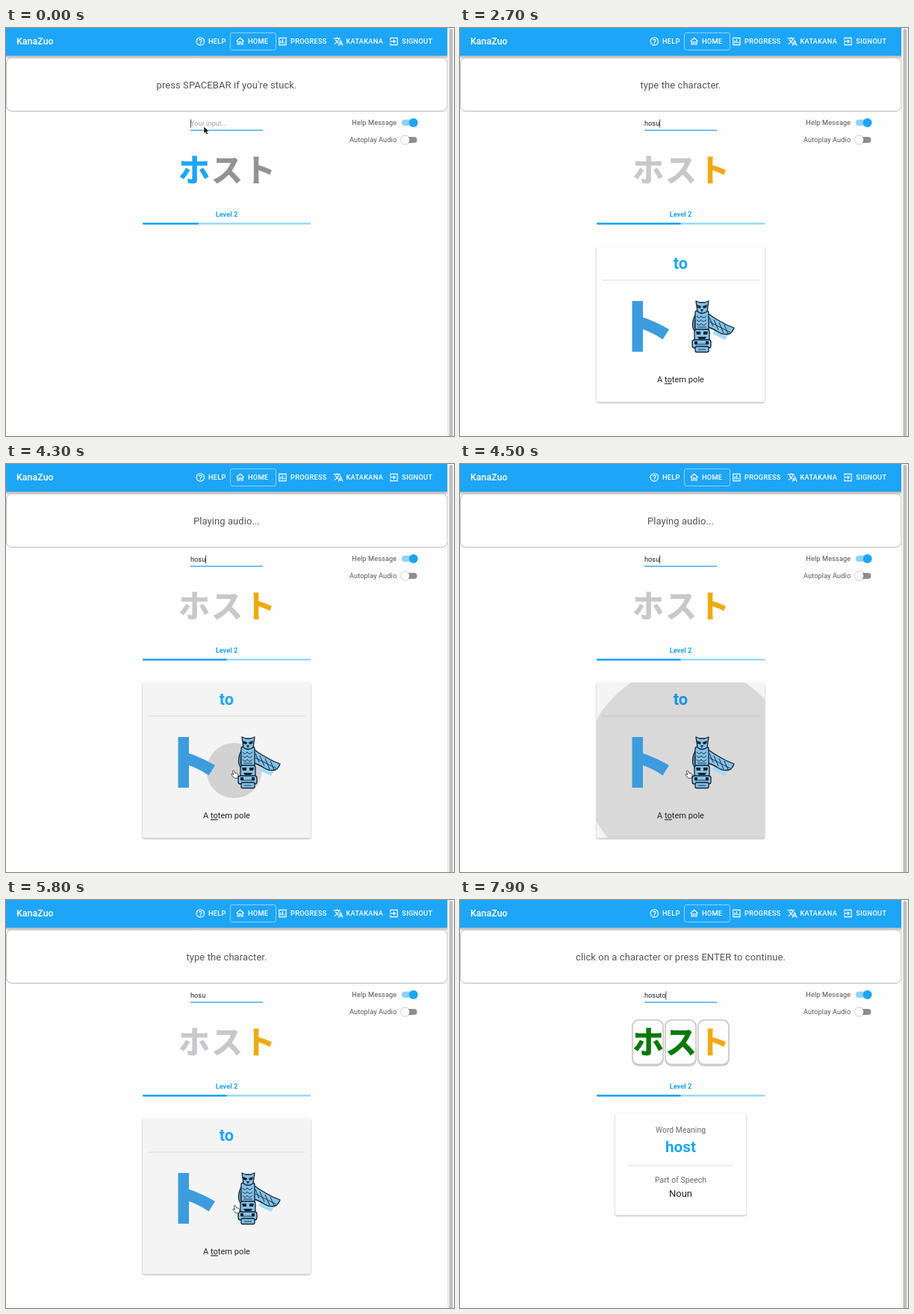
These frames come from a looping animation (600x547 px, 8 s). An HTML page:

```html
<!DOCTYPE html>
<html lang="en">
<head>
<meta charset="utf-8">
<title>Kana practice</title>
<style>
html, body { margin: 0; width: 100%; height: 100%; overflow: hidden; background: #fefefe; }
svg { display: block; width: 600px; height: 547px; font-family: Roboto, sans-serif; }
.nav { fill: #fff; font-weight: 500; font-size: 9.26px; letter-spacing: .0286em; }
.icon { fill: none; stroke: #fff; stroke-width: 2; }
.mid { text-anchor: middle; }
.kana { font: 700 42px "Noto Sans CJK JP", "Noto Sans CJK", sans-serif; text-anchor: middle; stroke-width: .7; }
.card { fill: #fff; filter: drop-shadow(0 1px 1px #0005); }
.totem { fill: #80c1ea; stroke: #17222c; stroke-width: 1.3; stroke-linejoin: round; }
.totem .line { fill: none; stroke-width: .9; }
.totem .dark { fill: #17222c; stroke: none; }
</style>
</head>
<body>
<svg viewBox="0 0 600 547">
  <defs>
    <linearGradient id="shade" x2="0" y2="1">
      <stop stop-color="#000" stop-opacity=".32"/><stop offset="1" stop-color="#000" stop-opacity="0"/>
    </linearGradient>
    <clipPath id="cardClip"><rect x="183" y="293" width="225" height="208.5" rx="2.5"/></clipPath>
  </defs>
  <rect width="600" height="547" fill="#fefefe"/>
  <rect y="37" width="591" height="5" fill="url(#shade)"/>
  <rect width="591" height="37" fill="#1da5f7"/>
  <g id="nav" class="nav"></g>
  <rect x=".5" y="40" width="590.5" height="71.5" rx="7" fill="#fefefe" stroke="#bdbabd"/>
  <path d="M247 137.2h97" stroke="#1d9fe8" stroke-width="1.3"/>
  <g font-size="9.26" fill="#555" text-anchor="end" letter-spacing=".087">
    <text x="523.3" y="130">Help Message</text>
    <text x="523.3" y="153">Autoplay Audio</text>
  </g>
  <rect x="530" y="122.8" width="20" height="8.2" rx="4.1" fill="#8ed2fb"/>
  <circle cx="545.7" cy="127" r="6" fill="#1da5f7"/>
  <rect x="531" y="145.9" width="19.5" height="8.2" rx="4.1" fill="#8f8d90"/>
  <circle cx="534.7" cy="150" r="5.8" fill="#fafafa" style="filter:drop-shadow(0 .5px .8px #0006)"/>
  <text class="mid" x="295.5" y="253" font-size="9.26" font-weight="700" fill="#1da5f7">Level 2</text>
  <rect x="183" y="260.9" width="225.5" height="2.5" rx="1.2" fill="#9bdafb"/>
  <g id="live"></g>
  <rect x="591" width="9" height="547" fill="#fafafa"/>
  <path d="M591.5 0v547" stroke="#e4e4e4"/>
  <rect x="593.5" y="1" width="5" height="560" rx="2.5" fill="#bfbfbf"/>
</svg>
<script>
const LOOP = 8000;
const BLUE = '#1da5f7', GREY = '#929195', PALE = '#c8c7cb', ORANGE = '#efa90d', GREEN = '#087808';
const CLICK = 4150, STUCK = 2600, DONE = 6700;
const $ = id => document.getElementById(id);

const typed = [[0, ''], [800, 'h'], [920, 'ho'], [1150, 'hos'], [1450, 'hosu'], [6150, 'hosut'], [DONE, 'hosuto']];
const messages = [[0, "press SPACEBAR if you're stuck."], [920, 'Good!'], [STUCK, 'type the character.'],
  [CLICK, 'Playing audio...'], [5700, 'type the character.'], [DONE, 'click on a character or press ENTER to continue.']];
const kanaColors = [[0, [BLUE, GREY, GREY]], [920, [GREY, BLUE, GREY]], [1450, [GREY, GREY, BLUE]],
  [STUCK, [PALE, PALE, ORANGE]], [DONE, [GREEN, GREEN, ORANGE]]];
const caretResets = [-200, 800, 920, 1150, 1450, STUCK, CLICK, 6150, DONE];
const mousePath = [[3100, 268, 150], [3400, 325, 325], [4000, 306, 411], [4700, 306, 411], [5000, 308, 409.5], [6150, 308, 409.5]];

const at = (steps, t) => steps.filter(s => s[0] <= t).pop()[1];
const ramp = (t, start, length) => Math.min(1, Math.max(0, (t - start) / length));
const smooth = u => u * u * (3 - 2 * u);
const label = (s, x, y, size, fill, extra = '') =>
  `<text x="${x}" y="${y}" font-size="${size}" fill="${fill}" ${extra}>${s}</text>`;
const centered = (s, y, size, fill, extra = '') => label(s, 295.5, y, size, fill, `class="mid" ${extra}`);
const rect = (x, y, w, h, r, extra) => `<rect x="${x}" y="${y}" width="${w}" height="${h}" rx="${r}" ${extra}/>`;

const pen = document.createElement('canvas').getContext('2d');
function widthOf(s) {
  pen.font = '9.26px Roboto, sans-serif';
  return pen.measureText(s).width;
}

const icons = [
  [253.3, 'HELP', 271, 'M3 12a9 9 0 1 0 18 0a9 9 0 1 0-18 0M9 10a3 3 0 1 1 4.5 2.6Q12 13.5 12 15M12 16v2'],
  [306.7, 'HOME', 324, 'M3.5 11.5 12 4l8.5 7.5M6 10v9h4v-6h4v6h4v-9'],
  [363.5, 'PROGRESS', 381, 'M4 4h16v16H4zM8 10v7M12 7v10M16 13v4'],
  [438, 'KATAKANA', 455.5, 'M1 5h16M9 2v3M14 5Q12 13 3 18M5.5 8Q8 13 13 16M12.5 22l5-12 5 12M14.5 18h6'],
  [512.6, 'SIGNOUT', 530.3, 'M4 9V4h16v16H4v-5M3 12h12M11 8l4 4-4 4']];
$('nav').innerHTML = label('KanaZuo', 14, 22, 12.3, '#fff', 'letter-spacing=".09"') +
  rect(300.5, 6.5, 61, 23, 2.5, 'fill="none" stroke="#8ed2fb"') +
  icons.map(([x, name, tx, d]) => `<path class="icon" transform="translate(${x} 11) scale(.579)" d="${d}"/>` +
    `<text x="${tx}" y="21.2">${name}</text>`).join('');

const totem = `<path d="M344 399l17 9-6 10-17-8z" fill="#a6d9f7"/>
<g class="totem">
  <path d="M331 382q8 6 17 11 10 6 19 9-2 6-6 8-9 2-16-3-8-5-14-6z"/>
  <path d="M317 382q-6 8-5.500 18 1 6 5 9z"/>
  <rect x="315" y="379" width="18" height="27" rx="3"/>
  <path d="M316 366l5 2h7l5-2-2 14q-7 5-13 0z"/>
  <rect x="314" y="404" width="20" height="15" rx="3"/>
  <rect x="311" y="418" width="25" height="11" rx="3"/>
  <rect x="315" y="427" width="18" height="7.500" rx="2"/>
  <path class="line" d="M317 386q3 5 6 0 3 5 7 0M317 391q3 5 6 0 3 5 7 0M317 396q3 5 6 0 3 5 7 0M318 401h12M334 388l5 12M340 391l6 14M347 395l6 14M354 398l5 12M334 394l28 14M314 391v12M319 431h10M315 424h17"/>
  <path class="dark" d="M317 371l6 2-1 3-4-1zM331 371l-6 2 1 3 4-1zM322 377h4l-2 4zM316 407h6v4h-5zM326 407h6l-1 4h-5zM318 414h12l-2 3h-8zM314 420h4v4h-4zM329 420h4v4h-4z"/>
</g>`;

function hintCard(t) {
  const hover = ramp(t, 3200, 200);
  const grow = t >= CLICK ? smooth(ramp(t, CLICK, 550)) : 0;
  const fade = .14 * (1 - ramp(t, 4400, 500));
  return rect(183, 293, 225, 208.5, 2.5, 'class="card"') +
    rect(183, 293, 225, 208.5, 2.5, `fill="#201020" opacity="${.045 * hover}"`) +
    centered('to', 323.3, 21.8, BLUE, 'font-weight="700"') +
    '<path d="M190.500 338h210.500" stroke="#dcdadd"/>' +
    `<circle cx="305.5" cy="411" r="${200 * grow}" opacity="${fade}" clip-path="url(#cardClip)"/>` +
    '<path d="M230.500 366h14.500v22q19 6 35 16l-8.500 13.500q-13-9-26.500-13.500v30h-14.500z" fill="#3c9cdd"/>' + totem +
    centered('A <tspan text-decoration="underline">to</tspan>tem pole', 475.3, 11.1, '#222');
}

function meaningCard() {
  return rect(208, 286, 175, 136.5, 2.5, 'class="card"') +
    centered('Word Meaning', 312, 10.25, '#666', 'letter-spacing=".09"') +
    centered('host', 338.3, 20.8, BLUE, 'font-weight="700"') +
    '<path d="M225 356h141" stroke="#dcdadd"/>' +
    centered('Part of Speech', 379, 10.35, '#666', 'letter-spacing=".09"') +
    centered('Noun', 398, 13, '#222');
}

const arrow = (x, y) => `<path transform="translate(${x} ${y})" d="M0 0v9.500l2.300-2 1.500 3.300 1.800-.8-1.500-3.200h3z" stroke="#fff" stroke-width=".7"/>`;
const hand = (x, y) => `<path transform="translate(${x} ${y})" d="M-1.500 0q-1.500 0-1 1.500l1.300 4-2.500-1q-1 .8 0 1.700l3.500 4h4.500l.7-5q-.5-2-4.500-2l-1-2.500z" fill="#fff" stroke="#222" stroke-width=".8"/>`;

function mouse(t) {
  if (t < 800) return arrow(265, 132);
  const i = mousePath.findIndex(p => p[0] > t);
  if (i < 1) return '';
  const [t0, x0, y0] = mousePath[i - 1], [t1, x1, y1] = mousePath[i];
  const u = smooth(ramp(t, t0, t1 - t0)), x = x0 + (x1 - x0) * u, y = y0 + (y1 - y0) * u;
  return y > 293 ? hand(x, y) : arrow(x, y);
}

function draw(t) {
  const input = at(typed, t), colors = at(kanaColors, t), done = t >= DONE;
  const sinceReset = t - caretResets.filter(r => r <= t).pop();
  const progress = (4 + ramp(t, 920, 400) + ramp(t, 1450, 400)) / 12;
  let out = centered(at(messages, t), 80.8, 12.97, '#555', 'letter-spacing=".097"');
  out += input ? label(input, 247, 131.2, 9.26, '#222') : label('Your input...', 247, 131.2, 9.26, '#a5a5a5');
  if (sinceReset % 1000 < 500) out += rect(247 + widthOf(input), 122.5, .8, 11, 0, 'fill="#222"');
  [...'ホスト'].forEach((c, i) => {
    if (done) out += rect(230 + 44 * i, 160, 43, 63, 9.5, 'fill="#cfcbcd"') + rect(231.8 + 44 * i, 161.8, 39.4, 57.7, 8, 'fill="#fefefe"');
    out += `<text class="kana" x="${252 + 44 * i}" y="206" fill="${colors[i]}" stroke="${colors[i]}">${c}</text>`;
  });
  out += rect(183, 260.9, 225.5 * progress, 2.5, 1.2, `fill="${BLUE}"`);
  if (done) out += meaningCard();
  else if (t >= STUCK) out += hintCard(t);
  $('live').innerHTML = out + mouse(t);
}

const start = performance.now();
function tick() {
  draw((performance.now() - start) % LOOP);
  requestAnimationFrame(tick);
}
tick();
</script>
</body>
</html>
```
